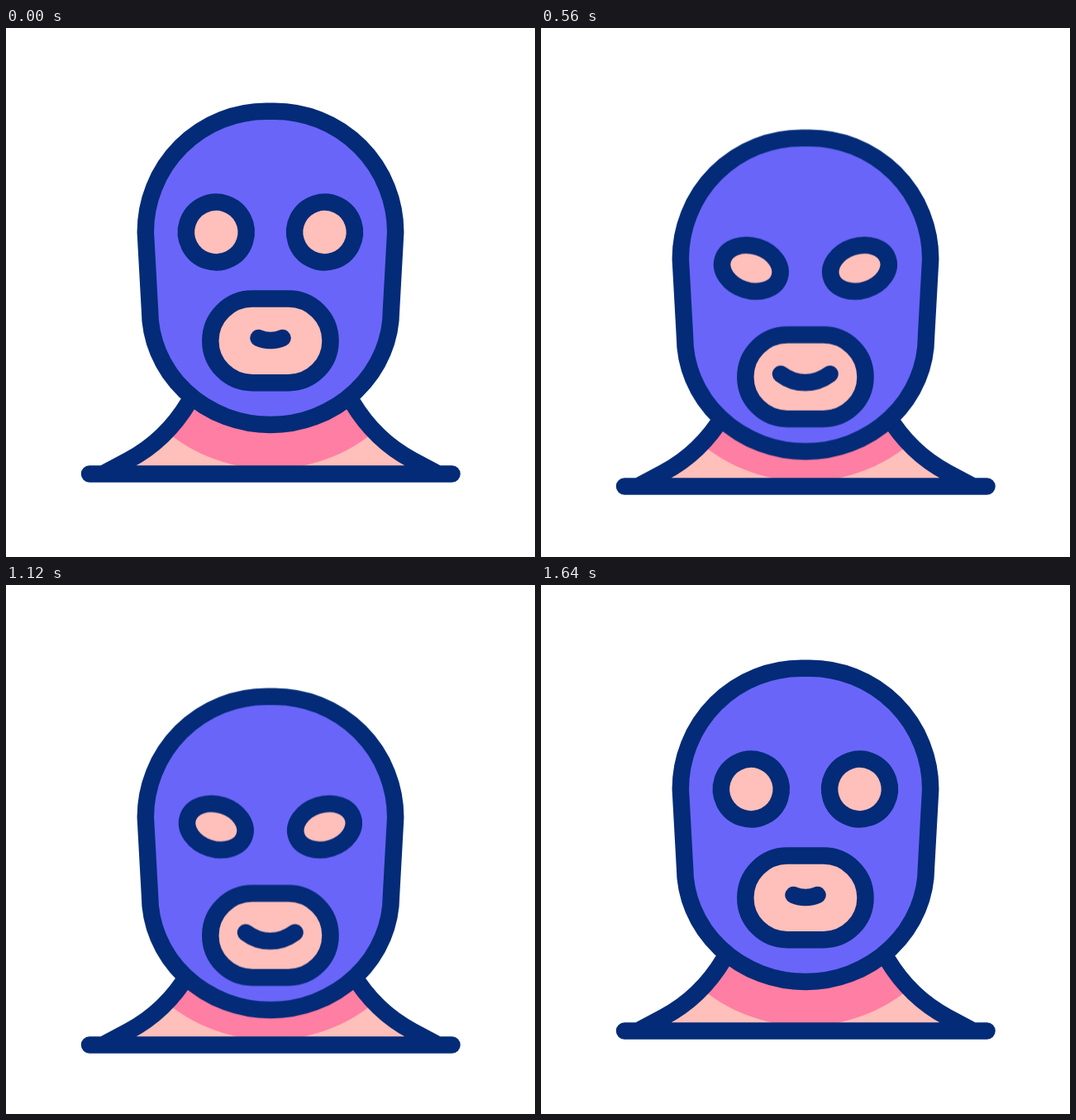
These frames come from a looping animation (640 px wide and 640 px high, 1720 ms). An HTML page:

```html
<!DOCTYPE html>
<html lang="en">
<head>
<meta charset="utf-8">
<title>Balaclava</title>
<style>
  html, body { margin: 0; width: 100%; height: 100%; overflow: hidden; background: #fff; }
  svg { display: block; width: 100%; height: 100%; }

  .line { fill: none; stroke: #032b77; stroke-width: 20.5; stroke-linecap: round; stroke-linejoin: round; }
  .mask { fill: #6965f9; }
  .skin { fill: #ffbfba; }
  .shade { fill: #ff7ea3; }

  .body, .head, .face, .eye, .smile {
    animation: 1720ms cubic-bezier(.45, 0, .49, 1) infinite;
  }
  .body { animation-name: sink; }
  .head { animation-name: nod; }
  .face { animation-name: tilt; }
  .eye { animation-name: squint; }
  .smile { animation-name: grin; }

  @keyframes sink {
    0%, 9.302% { transform: translateY(0); }
    50% { transform: translateY(22.3px); }
    95.349%, 100% { transform: translateY(0); }
  }
  @keyframes nod {
    0%, 6.977% { transform: translateY(0); }
    31.395%, 67.442% { transform: translateY(17.3px); }
    95.349%, 100% { transform: translateY(0); }
  }
  @keyframes tilt {
    0%, 6.977% { transform: translateY(0); }
    30.8%, 69.477% { transform: translateY(11.3px); }
    95.349%, 100% { transform: translateY(0); }
  }
  @keyframes squint {
    0%, 6.977% { rx: 36.4px; ry: 36.4px; }
    29.3%, 69.767% { rx: 36px; ry: 27px; }
    95.349%, 100% { rx: 36.4px; ry: 36.4px; }
  }
  @keyframes grin {
    0%, 6.977% { d: path("M305.5 375C314 379 326 379 334.5 375"); }
    31.395%, 67.442% { d: path("M290 375C308 388.8 331 388.8 349.5 375"); }
    95.349%, 100% { d: path("M305.5 375C314 379 326 379 334.5 375"); }
  }
</style>
</head>
<body>
<svg viewBox="0 0 640 640">
  <defs>
    <path id="neck" d="M117 539.5L148 523C182 505 206 478 221 453L228 441H412L419 453C434 478 458 505 492 523L523 539.5"/>
    <clipPath id="inside"><use href="#neck"/></clipPath>
  </defs>
  <g class="body">
    <use href="#neck" class="skin"/>
    <circle class="shade" cx="320" cy="336.6" r="197" clip-path="url(#inside)"/>
    <path class="line" d="M117 539.5L148 523C182 505 206 478 221 453L228 441M412 441L419 453C434 478 458 505 492 523L523 539.5M101 539.5H539.5"/>
    <g class="head">
      <path class="line mask" d="M168.8 247A146.2 146.2 0 0 1 315 100.8H325A146.2 146.2 0 0 1 471.2 247L466 341A146 139 0 0 1 174 341Z"/>
      <g class="face">
        <g transform="translate(254.3 247) rotate(18)"><ellipse class="line skin eye" rx="36.4" ry="36.4"/></g>
        <g transform="translate(385.5 247) rotate(-18)"><ellipse class="line skin eye" rx="36.4" ry="36.4"/></g>
        <rect class="line skin" x="247.3" y="327.5" width="145.2" height="101.7" rx="50.8"/>
        <path class="line smile" d="M305.5 375C314 379 326 379 334.5 375"/>
      </g>
    </g>
  </g>
</svg>
</body>
</html>
```
